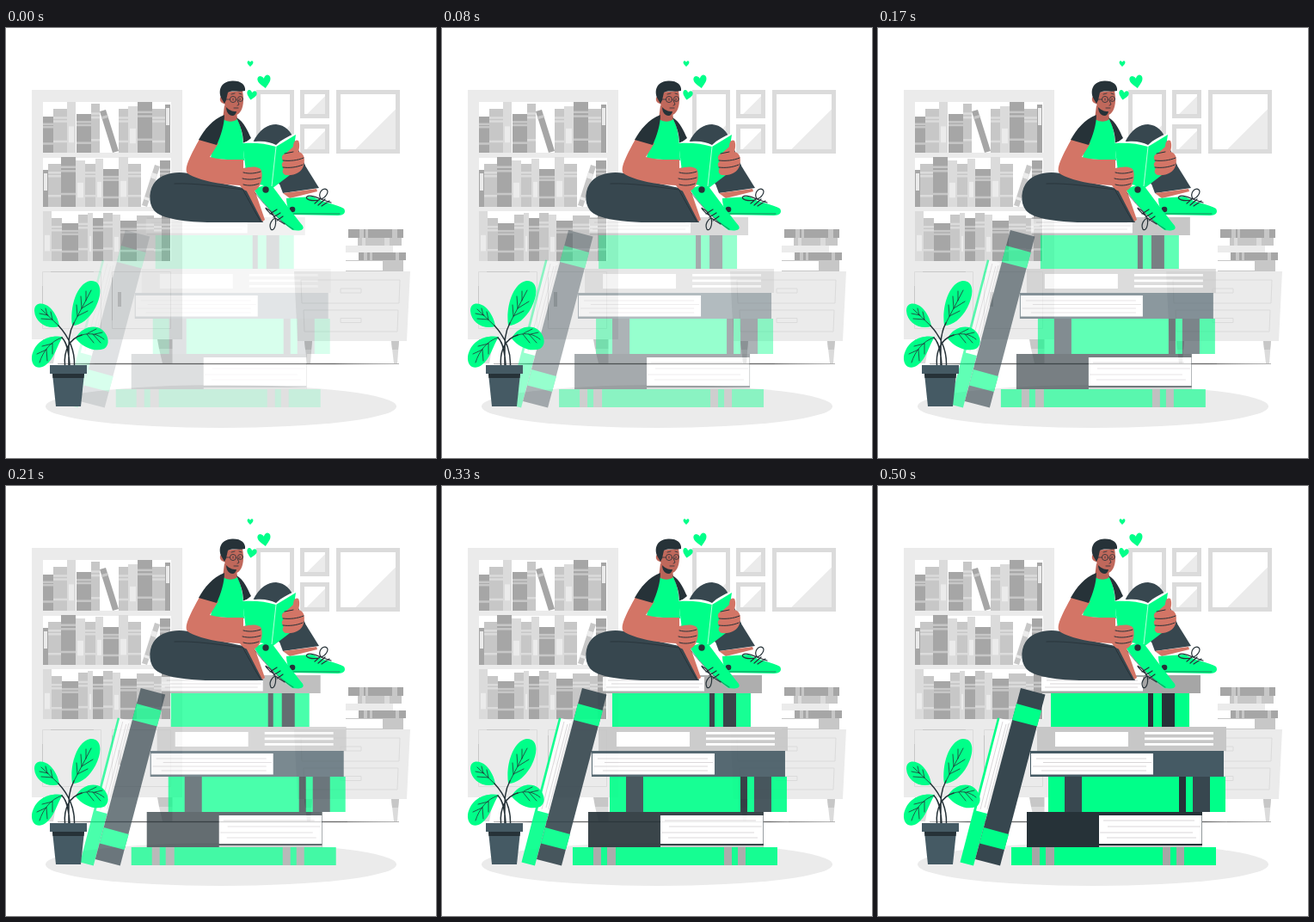
An HTML page for the animation above (540 ms loop, 500x500 px).

```html
<!DOCTYPE html>
<html lang="en">
<head>
<meta charset="utf-8">
<title>Reading on a stack of books</title>
<style>
html, body { margin: 0; width: 100%; height: 100%; overflow: hidden; background: #fff; }
svg { display: block; width: 100vw; height: 100vh; }
.green { fill: #00ff89; }
.ink { fill: #263238; }
.slate { fill: #37474f; }
.steel { fill: #455a64; }
.mid { fill: #a6a6a6; }
.soft { fill: #c7c7c7; }
.pale { fill: #dbdbdb; }
.mist { fill: #ebebeb; }
.white { fill: #fff; }
.skin { fill: #d37566; }
.line { fill: none; stroke: #263238; stroke-linecap: round; stroke-linejoin: round; }
.edge { fill: none; stroke: #dbdbdb; }
.pages { fill: none; stroke: #c9c4c8; stroke-width: .7; }
</style>
</head>
<body>
<svg viewBox="0 0 500 500">
  <defs>
    <path id="heart" d="M0 5C-3 2-5.500 0-5-3C-4-6-1-5 0-2.500C1-5 4-6 5-3C5.500 0 3 2 0 5Z"/>
  </defs>

  <ellipse class="mist" cx="250" cy="440" rx="204" ry="25"/>

  <!-- bookcase -->
  <path class="soft" d="M43 362h17l-2 11H43zM176 362h17.500v11H178z"/>
  <path class="pale" d="M43 373h15l-3 17H43zM178 373h15.500v17H182z"/>
  <path class="mist" d="M30 72h175v290H30z"/>
  <path class="white" d="M43 86h149v59H43zM43 151h149v57H43zM43 213h149v58H43z"/>
  <g id="shelves"></g>
  <path class="edge" d="M42.500 283.500h68v66h-68zM123.500 283.500h68v66h-68z"/>
  <path class="edge" style="stroke:#bbb;stroke-width:.6" d="M42.500 300v42M52 283.500h50M123.500 290v50"/>
  <path class="soft" d="M130 307h4v17h-4z"/>

  <g id="pictures"></g>

  <!-- cabinet -->
  <path class="pale" d="M347 364h9l-2 26h-4zM448 364h9l-2 26h-4z"/>
  <path class="soft" d="M347 364h9l-1 10h-7zM448 364h9l-1 10h-7z"/>
  <path class="mist" d="M335 283h135l-4 81H339z"/>
  <path class="edge" d="M343 293h115l-1 27H344zM346 328h110l-1 25H347zM389 303h24v5h-24zM389 337.500h24v5h-24z"/>
  <path class="mid" d="M398 234h64v10h-64zM410 261h55v9h-55z"/>
  <path class="soft" d="M409 244h51v9h-51zM411 234h5v10h-5zM418 234h3v10h-3zM449 234h6v10h-6zM416 261h4v9h-4zM423 261h3v9h-3zM453 261h4v9h-4z"/>
  <path class="pale" d="M414 244h4v9h-4zM440 244h6v9h-6z"/>
  <path class="mist" d="M395 253h55v8h-55z"/>
  <path class="soft" d="M395 270h67v13h-24v-12h-43zM395 282h44v1h-44z"/>
  <path class="white" d="M395 271h43v11h-43z"/>
  <path d="M60 390.500L105 390H380L457 390.500L380 391H105Z" fill="#555" stroke="#888" stroke-width=".4"/>

  <!-- sliding books -->
  <g id="stack">
    <path class="green" d="M155 420h238v21H155z"/>
    <path class="mid" d="M179 420h9v21h-9zM195 420h10v21h-10zM331 420h9v21h-9zM347 420h9v21h-9z"/>

    <path class="ink" d="M173 379h204v41H173z"/>
    <path class="white" d="M257 383h119.500v33H257z"/>
    <path class="soft" d="M257 418h120v2H257z"/>
    <path class="pages" d="M262 389h106M267 396h108M258 403h108M266 409h104"/>

    <path class="green" d="M198 338h206v41H198z"/>
    <path class="slate" d="M217 338h20v41h-20zM366 338h20v41h-20z"/>
    <path class="ink" d="M350 338h8v41h-8z"/>

    <path class="steel" d="M177 308h225v30H177z"/>
    <path class="white" d="M178 311h142v24.500H178z"/>
    <path class="pages" d="M184 317h128M192 321.500h126M180 326h132M190 331h122"/>

    <path class="soft" d="M185 280h220v28H185z"/>
    <path class="white" d="M206 286h85v17h-85zM310 286h80v2.800h-80zM310 292.500h80v2.800h-80zM310 299h80v2.800h-80z"/>

    <path class="green" d="M201 241h161v39H201z"/>
    <path class="ink" d="M314 241h6v39h-6zM330 241h15v39h-15z"/>

    <path class="mid" d="M191 220h184v21H191z"/>
    <path class="white" d="M190 222h118v16.500H190z"/>
    <path class="pages" d="M196 226h106M200 230h106M194 234h108"/>

    <path class="white" d="M141 270L154 273L127 381L112 377Z"/>
    <path class="pages" d="M145 274L119 376M149 277L124 374M152 276L127 376"/>
    <path class="green" d="M139 269.500L141.500 270L114 377.500L127 381L111 441.500L95.500 437.500Z"/>
    <path class="slate" d="M166 235L194.500 242.500L142 441.500L113 434Z"/>
    <path class="green" d="M161 253L190 261L185 279.500L156 272ZM123 397L152 405L147 423L118 415.500Z"/>
  </g>

  <!-- plant -->
  <path class="green" d="M77 346C74 325 82 297 98 294C112 293 112 310 104 325C97 338 87 346 77 346ZM62 347C48 351 34 343 33 329C33 318 44 319 51 325C57 331 61 339 62 347ZM81 361C87 348 103 344 112 351C120 358 121 369 114 373C103 377 90 372 81 361ZM66 359C50 356 33 364 30 382C29 394 38 398 46 392C56 385 59 370 66 359Z"/>
  <path class="line" stroke-width="1.500" d="M73 392C73 365 72 356 79 343M79.500 392C80 372 72 358 61 346M68.500 392C67 375 74 361 88 357M74 392C73 376 71 366 65 360"/>
  <path class="line" stroke-width=".8" d="M79 343L99 305M83 335L82 322M88 326L87 312M93 317L93 306M83 335L95 329M88 326L101 318M61 346L41 327M54 339L41 338M49 334L39 332M54 339L52 330M48 334L46 326M88 357C98 354 107 356 114 362M95 355L105 350M103 356L112 354M94 356L102 366M101 356L110 366M65 360C52 364 43 376 39 389M54 367L42 370M47 374L36 379M54 367L54 379M47 374L48 387"/>
  <path class="slate" d="M54 402h37l-4 38H58z" style="fill:#455a64"/>
  <path class="ink" d="M54 402h37l-.5 5h-36z"/>
  <path class="steel" d="M51 392h43v10H51z"/>

  <!-- reader -->
  <path class="slate" d="M287 133C295 117 305 112 314 112C325 113 331 120 334 128L348 160L318 182Z"/>
  <path class="slate" d="M316 176L328 160L346 157L364 186L322 192Z"/>
  <path class="skin" d="M322 192L361 187L362 190L330 198Z"/>
  <path class="green" d="M326 198L357 196C368 203 385 205 393 210C396 215 392 218 386 218L333 217C328 212 326 205 326 198Z"/>
  <path class="line" stroke-width=".6" d="M329 216H388"/>
  <circle class="ink" cx="333" cy="211" r="3.300"/>
  <path class="line" stroke-width="1.200" d="M359 204L366 198M363 206L371 199M367 207L376 201M364 200C355 202 347 199 350 196C354 193 361 197 366 199C362 191 369 185 373 188C376 191 371 198 366 199L378 203"/>

  <path class="slate" d="M276 186C250 180 228 177 212 169C196 166 182 170 174 178C166 187 165 203 172 212C180 222 210 226 240 226H299C293 212 287 199 282 188Z"/>
  <path class="line" stroke-width=".8" d="M196 181C222 180 250 185 276 188"/>
  <path class="line" stroke-width="1" d="M276 189C282 200 289 213 296 225"/>
  <path class="skin" d="M279 188L289 188L301 223L298 225Z"/>
  <path class="green" d="M288 187C296 185 304 180 309 183C318 195 333 215 345 230C348 236 340 236 333 235C318 224 299 204 291 192Z"/>
  <path class="line" stroke-width=".6" d="M290 192C303 209 319 225 334 234"/>
  <circle class="ink" cx="302" cy="188" r="3.700"/>
  <path class="line" stroke-width="1.200" d="M307 216L315 211M311 220L319 215M315 224L322 219M311 218C304 214 300 207 303 210C308 212 311 217 313 221C315 230 311 237 308 234C305 228 310 222 313 221L324 228"/>

  <path class="green" d="M254 105L268 104C276 118 276 135 277 154L238 152C240 135 246 116 254 105Z"/>
  <path fill="#b96358" d="M254 90L268 97L269 106C264 110 257 109 252 106Z"/>
  <path fill="#c0685b" d="M251 75L275 73C277 84 276 93 272 98C268 103 262 103 257 98L254 88C248 88 247 79 252 79Z"/>
  <path class="ink" d="M250 81C246 70 252 62 263 61.500C273 61 279 66 278 73C270 75 264 72 258 75L256 84L254 88Z"/>
  <path class="ink" d="M256 92C261 97 265 97 268 97C267 102 264 103 260 101C257 99 256 95 256 92Z"/>
  <g class="line" stroke-width=".8">
    <circle cx="264" cy="83" r="3.600"/>
    <circle cx="272.500" cy="82.500" r="3"/>
    <path d="M255 83L260 83M262 77L266 76M271 76L274 77M269 84L271 89L269 90M265 93L270 93M264 82V84M272 82V84"/>
  </g>
  <path class="skin" d="M225 129L247 134L237 150C250 154 265 153 276 153V163C286 160 295 161 297 166C299 173 297 188 286 190C278 190 274 186 272 183C250 182 225 178 211 169C206 163 216 146 225 129Z"/>
  <path class="ink" d="M254 101C240 106 231 118 224 130L245 136C250 125 254 112 254 101ZM268 104C277 109 281 120 285 128L276 135C276 122 272 113 268 104Z"/>
  <path class="white" d="M275 134C279 131 285 131 290 132C300 131 308 133 314 136C320 130 328 126 335 123L337 127L314 140Z"/>
  <path class="green" d="M275 134C288 133 302 134 314 138L309 187C302 182 292 181 281 183ZM314 138L337 124L330 171L309 187Z"/>
  <path fill="none" stroke="#b3ffdb" stroke-width="1" d="M314 138L309 184"/>
  <path class="skin" d="M275 164C285 160 296 161 297 166C299 173 297 187 286 190C278 191 273 186 273 181ZM334 138C334 132 337 129 340 131C342 135 341 140 340 144C347 145 348 153 346 160C344 168 335 172 325 171C321 169 321 166 323 163C320 160 320 157 323 155C319 151 321 147 325 146Z"/>
  <path class="line" stroke-width="1" d="M276 168C283 170 290 169 296 167M275 175C282 177 290 176 296 174M276 182C282 184 289 183 294 181M322 154C330 155 339 154 346 151M322 162C330 163 338 162 345 159M324 146L334 144"/>

  <g class="green">
    <use href="#heart" transform="translate(284 41.500) scale(.68)"/>
    <use href="#heart" transform="translate(300.500 62.500) rotate(-10) scale(1.500)"/>
    <use href="#heart" transform="translate(285.500 78) rotate(12) scale(1.120)"/>
  </g>
</svg>
<script>
const make = (parent, tag, attrs) => {
  const el = document.createElementNS('http://www.w3.org/2000/svg', tag);
  for (const key in attrs) el.setAttribute(key, attrs[key]);
  parent.append(el);
};
const block = (parent, tone, x, y, width, height) =>
  make(parent, 'rect', { class: tone, x, y, width, height });
const $ = id => document.getElementById(id);

const tones = ['mid', 'soft', 'pale', 'mist'];

// Each volume is [left, right, top, tone].
const rows = [
  [145, [[43, 55, 103, 0], [55, 71, 94, 1], [71, 81, 86, 2], [82, 99, 100, 0], [99, 109, 88, 1],
    [131, 142, 94, 1], [142, 153, 91, 2], [153, 170, 86, 0], [170, 185, 94, 1], [185, 191, 89, 0]]],
  [208, [[43, 49, 165, 0], [49, 64, 158, 1], [64, 81, 150, 0], [81, 92, 154, 2], [92, 104, 158, 1],
    [104, 113, 152, 2], [113, 131, 164, 0], [131, 142, 150, 2], [142, 157, 158, 1], [179, 191, 154, 0]]],
  [271, [[43, 53, 213, 2], [53, 65, 221, 1], [65, 84, 227, 0], [84, 95, 217, 1], [95, 101, 215, 2],
    [101, 113, 221, 0], [113, 124, 215, 1], [124, 133, 217, 2], [133, 152, 224, 0], [152, 172, 218, 1],
    [172, 181, 221, 1], [181, 191, 218, 0]]]
];
const shelves = $('shelves');
for (const [base, volumes] of rows) {
  for (const [left, right, top, tone] of volumes) {
    const width = right - left, height = base - top;
    block(shelves, tones[tone], left, top, width, height);
    if (width < 7 && tone === 0) {
      block(shelves, 'mist', left + 1, top + 4, width - 2, 20);
    } else if (tone === 2) {
      block(shelves, 'mist', left + 2, top + height * .48, width - 4, height * .32);
    } else {
      for (const at of [.18, .26, .72]) block(shelves, tones[tone + 1], left, top + height * at, width, 2.5);
    }
  }
}
make(shelves, 'path', { class: 'mid', d: 'M109 97L116 95L131 143L124 145Z' });
make(shelves, 'path', { class: 'soft', d: 'M111 103L118 101L119 104L112 106ZM173 159L179 161L164 208L158 206Z' });
make(shelves, 'path', { class: 'mist', d: 'M170 168L176 170L174 176L168 174ZM161 196L167 198L166 201L160 199Z' });

for (const [x, y, w, h] of [[291, 72, 44, 74], [342, 72, 34, 33], [342, 112, 34, 34], [384, 72, 74, 74]]) {
  const right = x + w - 5, bottom = y + h - 5, size = Math.min(w, h) * .63;
  block($('pictures'), 'pale', x, y, w, h);
  block($('pictures'), 'white', x + 5, y + 5, w - 10, h - 10);
  make($('pictures'), 'path', { class: 'mist', d: `M${right} ${bottom}h${-size}L${right} ${bottom - size}Z` });
}

// The books ease in from the left at 24 steps per second, snapped to 10 ms.
const LOOP = 540, STEPS = 13, TRAVEL = 32;
const stack = $('stack');
function draw() {
  const time = performance.now() % LOOP;
  const step = Math.floor((Math.floor(time / 10) + .4) * 6 / 25);
  const rest = (1 - (step + 1) / STEPS) ** 2;
  stack.setAttribute('transform', `translate(${-TRAVEL * rest} 0)`);
  stack.setAttribute('opacity', 1 - rest);
  requestAnimationFrame(draw);
}
draw();
</script>
</body>
</html>
```
